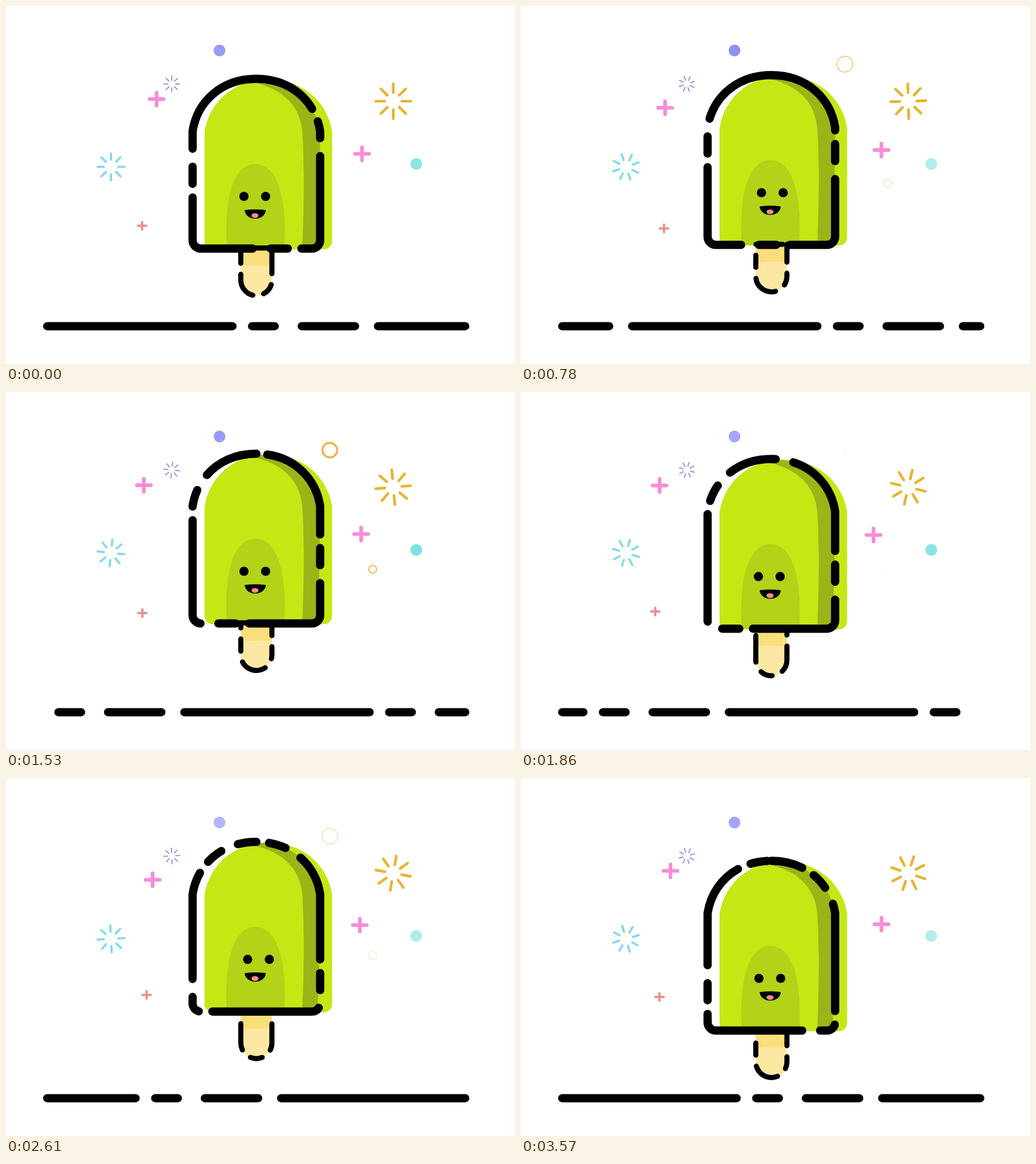
Recreate the animation shown at these times as an HTML page with a canvas. Size 892 by 628 pixels, loop 3.6 s.

```html
<!DOCTYPE html>
<html lang="en">
<head>
<meta charset="utf-8">
<title>Ice lolly</title>
<style>
  html, body { margin: 0; width: 100%; height: 100%; overflow: hidden; background: #fff; }
  canvas { display: block; }
</style>
</head>
<body>
<canvas id="stage" width="892" height="628"></canvas>
<script>
const ctx = document.getElementById('stage').getContext('2d');
const LOOP = 3600, STEP = 30, TAU = Math.PI * 2;
const PINK = '#f78cd6', RED = '#ea9090';

const shell = new Path2D(
  'M438.75 127.8C500.75 127.8 542.75 168.7 550.5 219.7V411A14.5 14.5 0 0 1 536 425.5' +
  'H341.5A14.5 14.5 0 0 1 327 411V219.7C334.75 168.7 376.75 127.8 438.75 127.8');
const stick = new Path2D('M466 424.5V480.75A27.25 27.25 0 0 1 411.5 480.75V424.5H466');
const shade = new Path2D(
  'M412 131Q425 128 438.75 128C500.75 128 542.75 169 550.5 220Q550 330 545.5 430' +
  'H519Q522 360 522 300C521 265 521 240 519 218C514 165 470 136 412 131Z');
const belly = new Path2D('M387 425.5C384 385 384 277 437 277C490 277 491 385 487.5 425.5Z');
const mouth = new Path2D('M418.3 359.5Q418 358 420 357.7Q437 356 453.5 357.7Q455.5 358 455.2 359.5C452 377.5 422 377.5 418.3 359.5Z');
const ground = new Path2D('M72.3 561.7H804.7');

// Turning points of the lolly's hover: [step, height]
const hover = [[0, 0], [26, -6.5], [51, -19.5], [75, 1.5], [87, -15.8], [103, -6.5], [119, 17.5]];

function ease(from, to, step) {
  const u = Math.min(1, Math.max(0, (step - from) / (to - from)));
  return u * u * (3 - 2 * u);
}

function wave(step, middle, reach, period, peak) {
  return middle + reach * Math.cos((step - peak) / period * TAU);
}

function hoverAt(step) {
  return hover.reduce((y, [at, next], i) =>
    i ? y + (next - hover[i - 1][1]) * ease(hover[i - 1][0], at, step) : next, 0);
}

// The eyes glance left, then right, then back to the middle.
function gazeAt(step) {
  const p = step % 60;
  return 7.3 * (2 * ease(21, 28, p) - ease(0, 9, p) - ease(36, 45, p));
}

function fill(path, color) {
  ctx.fillStyle = color;
  ctx.fill(path);
}

function disc(x, y, rx, color, ry = rx) {
  ctx.beginPath();
  ctx.ellipse(x, y, rx, ry, 0, 0, TAU);
  ctx.fillStyle = color;
  ctx.fill();
}

function dot(x, y, color, alpha) {
  ctx.globalAlpha = Math.min(1, alpha);
  disc(x, y, 10.3, color);
  ctx.globalAlpha = 1;
}

function dashed(path, width, pattern, shift) {
  ctx.save();
  ctx.strokeStyle = '#000';
  ctx.lineWidth = width;
  ctx.setLineDash(pattern);
  ctx.lineDashOffset = -shift;
  ctx.stroke(path);
  ctx.restore();
}

function strokeWith(color, width) {
  ctx.strokeStyle = color;
  ctx.lineWidth = width;
  ctx.stroke();
}

function plus(x, y, size, width, color) {
  ctx.beginPath();
  ctx.moveTo(x - size, y);
  ctx.lineTo(x + size, y);
  ctx.moveTo(x, y - size * .92);
  ctx.lineTo(x, y + size * .92);
  strokeWith(color, width);
}

function burst(x, y, inner, outer, width, color, degrees) {
  ctx.beginPath();
  for (let i = 0; i < 8; i++) {
    const a = (i / 8 + degrees / 360) * TAU;
    const c = Math.cos(a), s = Math.sin(a);
    ctx.moveTo(x + c * inner, y + s * inner);
    ctx.lineTo(x + c * outer, y + s * outer);
  }
  strokeWith(color, width);
}

// A ring grows, then thins out to nothing.
function ring(x, y, scale, step) {
  const p = step % 30;
  const radius = Math.min(13.9, p * .61);
  const width = Math.min(radius * .34, .46 * (28.6 - p));
  if (width <= 0) return;
  ctx.beginPath();
  ctx.arc(x, y, radius * scale, 0, TAU);
  strokeWith('#f3b044', width * scale);
}

function drawSky(step) {
  dot(374.2, 78, '#8f8ff5', wave(step, .84, .17, 130, 25));
  dot(719, 277, '#76e0dc', wave(step, 1.15, .58, 31, 10.5));

  burst(678.7, 167, 14.8, 30.7, 4.7, '#e8b330', step * 5 / 3);
  burst(184, 282.2, 12.6, 23.6, 3.8, '#82d9f2', step);
  burst(290.5, 136.7, 6.8, 13.8, 2, '#9a92e2', step);

  ring(567.5, 102, 1, step);
  ring(642.5, 311, .54, step);

  plus(wave(step, 252.8, 11.3, 110, 108), wave(step, 170.5, 8, 60, 26), 12.3, 6.4, PINK);
  plus(wave(step, 624, 7.7, 95, 24), wave(step, 254.3, 5.3, 105, -5), 12.3, 6.4, PINK);
  plus(wave(step, 243, 7.7, 74, 26), wave(step, 385.3, 5, 125, 30), 7.3, 4, RED);
}

function drawLolly(step) {
  ctx.save();
  ctx.translate(0, hoverAt(step));

  fill(stick, '#fce8a3');
  ctx.fillStyle = '#f9de7c';
  ctx.fillRect(411.5, 424.5, 54.5, 31);

  ctx.save();
  ctx.translate(21, 1.3);
  fill(shell, '#c3e814');
  ctx.clip(shell);
  ctx.translate(-21, -1.3);
  fill(shade, '#9bb417');
  fill(belly, '#b2d317');
  ctx.restore();

  const look = gazeAt(step);
  disc(417 + look, 334, 8.1, '#000');
  disc(455 + look, 334, 8.1, '#000');
  fill(mouth, '#000');
  disc(436.4, 367.6, 6.2, '#f58e8c', 4.2);

  dashed(stick, 9, [21.2, 19.5, 46.5, 19.5], 64.5 - step * 4.63);
  dashed(shell, 14.5, [188.5, 24, 30, 31.5], step * 1.794 - 72.2);
  ctx.restore();
}

function draw(time) {
  const step = Math.floor((time % LOOP) / STEP);
  ctx.fillStyle = '#fff';
  ctx.fillRect(0, 0, 892, 628);
  ctx.lineCap = 'round';
  drawSky(step);
  dashed(ground, 14.5, [324.5, 34.5, 39.5, 47.5, 93.3, 40.4], step * 4.712);
  drawLolly(step);
}

const start = performance.now();
function tick() {
  draw(performance.now() - start);
  requestAnimationFrame(tick);
}
tick();
</script>
</body>
</html>
```
